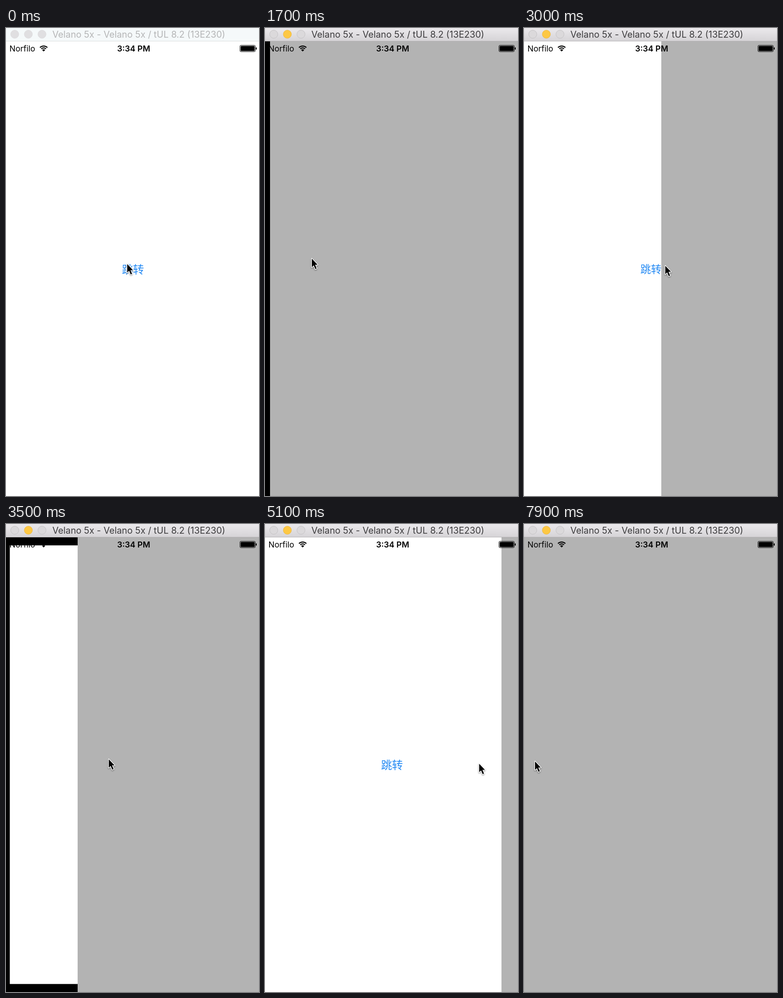
These frames come from a looping animation (551 by 1016 pixels, 8 s). An HTML page with a canvas:

```html
<!DOCTYPE html>
<html lang="zh">
<head>
<meta charset="utf-8">
<title>Page transition</title>
<style>
html, body { margin: 0; width: 100%; height: 100%; overflow: hidden; background: #fff; }
canvas { display: block; }
</style>
</head>
<body>
<canvas id="stage" width="551" height="1016"></canvas>
<script>
const ctx = document.getElementById('stage').getContext('2d');
const W = 551, H = 1016, TOP = 29, LOOP = 8000, STEP = 100;
const SANS = 'Inter, "Open Sans", sans-serif';
const PUSH_TIME = 515, DRAG_START = 1300, RELEASE = 4950, SECOND_PUSH = 7120;

function ease(p) {
  p = Math.min(1, Math.max(0, p));
  return p < .5 ? 2 * p * p : 1 - 2 * (1 - p) ** 2;
}

// Each gesture eases the pointer from wherever it is to a new place.
const gestures = [
  { at: 600, lasts: 500, x: 14, y: 492 },
  { at: DRAG_START, lasts: 1100, x: 343, y: 516 },
  { at: 2400, lasts: 2000, x: 141, y: 503 },
  { at: 4400, lasts: 550, x: 470, y: 518 },
  { at: RELEASE, lasts: 1350, x: 284, y: 519 },
  { at: 6500, lasts: 500, x: 272, y: 513 },
  { at: 7400, lasts: 500, x: 23, y: 513 }
];

function pointerAt(t) {
  let x = 263, y = 510;
  for (const g of gestures) {
    const p = ease((t - g.at) / g.lasts);
    x += (g.x - x) * p;
    y += (g.y - y) * p;
  }
  return { x, y };
}

// 0: the grey page covers everything, 1: it is off to the right.
function openness(t) {
  if (t < DRAG_START) return 1 - ease((t - 100) / PUSH_TIME);
  if (t >= SECOND_PUSH) return 1 - ease((t - SECOND_PUSH) / PUSH_TIME);
  // The page trails the pointer slightly, then completes by itself.
  const held = pointerAt(Math.min(t - 50, RELEASE));
  const drag = ease((held.x - 25) / W);
  return drag + (1 - drag) * ease((t - RELEASE) / 600);
}

function rect(color, x, y, w, h) {
  ctx.fillStyle = color;
  ctx.fillRect(x, y, w, h);
}

function text(str, x, y, font, color, align = 'left') {
  ctx.font = font;
  ctx.fillStyle = color;
  ctx.textAlign = align;
  ctx.fillText(str, x, y);
}

function drawTitleBar(active) {
  const bar = ctx.createLinearGradient(0, 0, 0, 28);
  bar.addColorStop(0, active ? '#ebe9ec' : '#f5f9fa');
  bar.addColorStop(1, active ? '#d6d4d7' : '#f5f9fa');
  rect(bar, 0, 0, W, 28);
  rect(active ? '#b6b4b6' : '#d9dcdd', 0, 28, W, 1);
  for (let i = 0; i < 3; i++) {
    const amber = active && i === 1;
    ctx.beginPath();
    ctx.arc(19 + 29.7 * i, 13.5, 8.8, 0, 7);
    ctx.fillStyle = amber ? '#fdc844' : active ? '#dbd9db' : '#e0dfe1';
    ctx.fill();
    ctx.lineWidth = 1;
    ctx.strokeStyle = amber ? '#efb93f' : active ? '#c4c2c4' : '#dddcde';
    ctx.stroke();
  }
  text('Velano 5x - Velano 5x / tUL 8.2 (13E230)', 101, 21, `19.7px ${SANS}`,
    active ? '#3d3c3e' : '#b5b6b7');
}

function drawPages(open) {
  const left = Math.round(open * W);
  const inset = Math.max(0, .164 * (262 - left));
  const side = Math.max(0, inset * .562 - 1.5);
  const scale = .9 + .1 * open;
  rect('#000', 0, TOP, W, H - TOP);
  rect('#fff', side, TOP + inset, W + 3 - 2 * side, H - TOP - 2 * inset);
  ctx.save();
  ctx.translate(276.5, 523);
  ctx.scale(scale, scale);
  text('跳转', 0, 9.5, '24px "Noto Sans CJK SC", "Noto Sans CJK", sans-serif', '#2389f3', 'center');
  ctx.restore();
  rect('#b3b3b3', left, TOP, W, H - TOP);
}

function drawStatus() {
  text('Norfilo', 7.5, 51, `17.5px ${SANS}`, '#000');
  text('3:34 PM', 278, 51, `600 17.7px ${SANS}`, '#000', 'center');

  // Signal: a wedge and two arcs in the upper quarter circle
  const from = -Math.PI * .75, to = -Math.PI * .25;
  ctx.strokeStyle = ctx.fillStyle = '#000';
  ctx.lineWidth = 2.3;
  for (const r of [7.4, 11.4]) {
    ctx.beginPath();
    ctx.arc(82, 50.5, r, from, to);
    ctx.stroke();
  }
  ctx.beginPath();
  ctx.moveTo(82, 51);
  ctx.arc(82, 51, 4.8, from, to);
  ctx.fill();

  // Battery
  ctx.lineWidth = 1;
  ctx.beginPath();
  ctx.roundRect(509.5, 37.5, 33.5, 14, 2.5);
  ctx.stroke();
  ctx.beginPath();
  ctx.roundRect(511, 39, 30.5, 11, 1.5);
  ctx.roundRect(544, 42, 2, 5, 1);
  ctx.fill();
}

const arrow = new Path2D('M1 2.5V20.8L5.2 16.9L8.6 25L11.5 23.8L8.1 15.7H13.6Z');

function drawPointer({ x, y }) {
  ctx.save();
  ctx.translate(x, y);
  ctx.lineJoin = 'round';
  ctx.lineWidth = 2.8;
  ctx.strokeStyle = '#fff';
  ctx.shadowColor = 'rgba(0,0,0,.4)';
  ctx.shadowBlur = 3;
  ctx.shadowOffsetY = 1.5;
  ctx.stroke(arrow);
  ctx.shadowColor = 'transparent';
  ctx.fillStyle = '#000';
  ctx.fill(arrow);
  ctx.restore();
}

const start = performance.now();

function loop() {
  const t = Math.floor((performance.now() - start) % LOOP / STEP) * STEP;
  drawPages(openness(t));
  drawStatus();
  drawTitleBar(t >= 100);
  drawPointer(pointerAt(t));
  requestAnimationFrame(loop);
}
loop();
</script>
</body>
</html>
```
